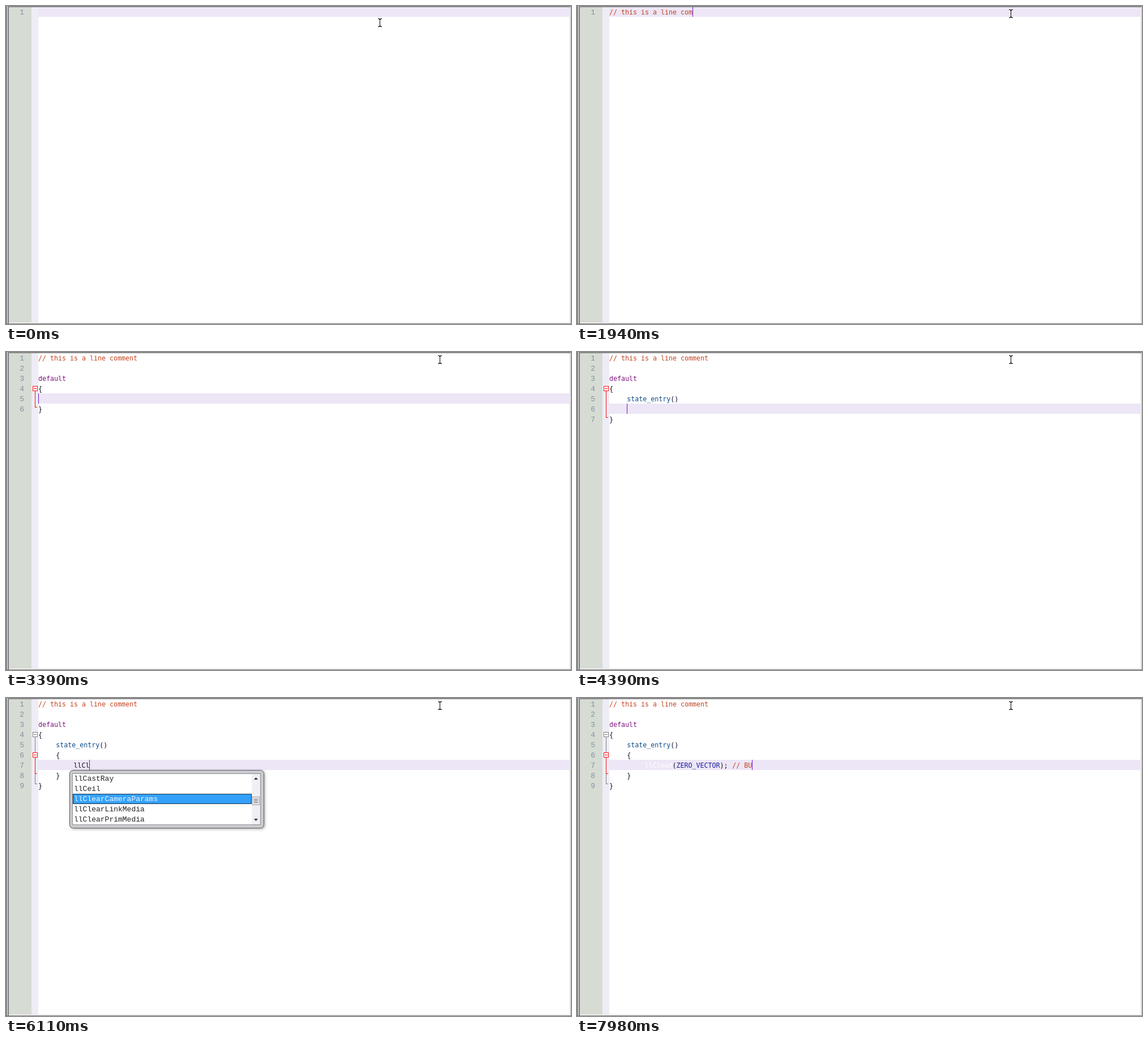
Animation, 998 px wide and 561 px high, one loop 8000 ms. Source, as an HTML page with a canvas:

```html
<!DOCTYPE html>
<html lang="en">
<head>
<meta charset="utf-8">
<title>Code editor with autocompletion</title>
<style>
  html, body { margin: 0; width: 100%; height: 100%; overflow: hidden; background: #fff; }
  canvas { display: block; }
</style>
</head>
<body>
<canvas id="stage" width="998" height="561"></canvas>
<script>
const ctx = document.getElementById('stage').getContext('2d');
const LOOP = 8000, LINE = 18, LEFT = 57, TAB = 31.2, BLINK = 530;
const CODE = '11.63px "DejaVu Sans Mono", monospace';
const COURIER = '13px "Liberation Mono", monospace';
const INK = '#101028', RED = '#ff1010', GRAY = '#808080';

// Sorted completion entries: constants, events and keywords, functions.
const WORDS = `VEHICLE_VERTICAL_ATTRACTION_TIMESCALE WANDER_PAUSE_AT_WAYPOINTS
  ZERO_ROTATION ZERO_VECTOR at_rot_target at_target attach changed collision
  collision_end collision_start control dataserver default do else float for
  http_request http_response if integer jump key land_collision land_collision_end
  land_collision_start link_message list listen llAbs llAcos llAddToLandBanList
  llBreakAllLinks llBreakLink llCSV2List llCastRay llCeil llClearCameraParams
  llClearLinkMedia llClearPrimMedia llCloseRemoteDataChannel llCloud
  llCollisionFilter llCollisionSound return rotation run_time_permissions sensor
  state state_entry state_exit string timer touch touch_end`.split(/\s+/);

const TOKEN_COLORS = {
  default: '#7d107d', state: '#7d107d', state_entry: '#0c4a88',
  llCloud: '#ffffff', ZERO_VECTOR: '#1c1c9c'
};

// Keystrokes: start time, interval, keys ("^" is cursor up).
const keystrokes = [
  [840, 60, '// this is a l'], [1700, 38, 'ine comment'], [2130, 60, '\n\n'],
  [2240, 50, 'defau'], [2510, 60, 'lt'], [2690, 130, '\n{\n}^'], [3360, 0, '\n'],
  [3460, 46, '\tstate_entry()'], [4200, 240, '\n{'], [5010, 120, '\n}^'],
  [5500, 120, '\n\t'], [5840, 80, 'llCloud('], [6480, 42, 'ZERO_VECT'],
  [6900, 70, 'OR'], [7100, 200, ');'], [7560, 82, ' // BU']
].flatMap(([start, step, chars]) => [...chars].map((key, i) => ({ time: start + i * step, key })));

function editorAt(t) {
  const ed = { lines: [''], row: 0, col: 0, last: { time: -760, key: '' } };
  for (const k of keystrokes) {
    if (k.time > t) break;
    const line = ed.lines[ed.row];
    if (k.key === '^') {
      ed.row--;
    } else if (k.key === '\n') {
      const indent = line.match(/^\t*/)[0];
      ed.lines.splice(ed.row, 1, line.slice(0, ed.col), indent + line.slice(ed.col));
      ed.row++;
      ed.col = indent.length;
    } else {
      ed.lines[ed.row] = line.slice(0, ed.col) + k.key + line.slice(ed.col);
      ed.col++;
    }
    ed.last = k;
  }
  return ed;
}

const lineTop = row => 1 + row * LINE;

function rect(x, y, w, h, color) {
  ctx.fillStyle = color;
  ctx.fillRect(x, y, w, h);
}

function drawText(str, x, y, color, font) {
  ctx.font = font;
  ctx.fillStyle = color;
  ctx.fillText(str, x, y);
}

function layoutLine(line) {
  let x = LEFT, col = 0;
  return (line.match(/\/\/.*|\s|\w+|./g) || []).map(str => {
    const token = { str, x, col };
    ctx.font = str === ' ' ? COURIER : CODE;
    token.width = str === '\t' ? TAB : ctx.measureText(str).width;
    token.color = str.startsWith('//') ? '#c4431f' : TOKEN_COLORS[str] || INK;
    x += token.width;
    col += str.length;
    return token;
  });
}

function columnX(line, col) {
  const tokens = layoutLine(line.slice(0, col)), end = tokens[tokens.length - 1];
  return end ? end.x + end.width : LEFT;
}

function findBrackets(lines) {
  return lines.flatMap((line, row) => [...line.replace(/\/\/.*/, '')]
    .map((ch, col) => ({ ch, row, col })).filter(b => '{}()'.includes(b.ch)));
}

function highlightedBraces(ed, all) {
  const at = all.find(b => b.row === ed.row && b.col === ed.col - 1) ||
             all.find(b => b.row === ed.row && b.col === ed.col);
  if (!at) return [];
  const kind = '{}'.includes(at.ch) ? '{}' : '()';
  const stack = [];
  for (const b of all.filter(b => kind.includes(b.ch))) {
    if (b.ch === kind[0]) { stack.push(b); continue; }
    const open = stack.pop();
    if (open === at || b === at) return [open, b];
  }
  return [at];
}

function foldsOf(lines, all) {
  const folds = [], stack = [];
  for (const b of all) {
    if ('{('.includes(b.ch)) {
      const fold = { start: b.row, end: lines.length - 1, closed: false };
      stack.push(fold);
      folds.push(fold);
    } else if (stack.length) {
      Object.assign(stack.pop(), { end: b.row, closed: true });
    }
  }
  return folds.filter(f => f.end > f.start || !f.closed);
}

function drawFolds(folds, row) {
  const active = folds.filter(f => f.start <= row && row <= f.end).pop();
  const color = f => f === active ? RED : GRAY;
  const ordered = folds.filter(f => f !== active).concat(active || []);
  for (const f of ordered) {
    if (f.end === f.start) continue;
    const y = lineTop(f.start) + 9, bottom = lineTop(f.end) + 6;
    rect(51, y, 1, bottom - y, color(f));
    rect(51, bottom, 4, 1, color(f));
  }
  for (const f of ordered) {
    const y = lineTop(f.start) + 5;
    rect(47, y, 9, 9, color(f));
    rect(48, y + 1, 7, 7, '#fff');
    rect(49, y + 4, 5, 1, color(f));
  }
}

function triangle(x, y, dir) {
  ctx.fillStyle = '#333';
  ctx.beginPath();
  ctx.moveTo(x - 3.5, y - 2 * dir);
  ctx.lineTo(x + 3.5, y - 2 * dir);
  ctx.lineTo(x, y + 2 * dir);
  ctx.fill();
}

function drawPopup(x, y, match) {
  ctx.save();
  ctx.shadowColor = 'rgba(60,65,60,.5)';
  ctx.shadowBlur = 5;
  ctx.shadowOffsetX = ctx.shadowOffsetY = 1.5;
  ctx.beginPath();
  ctx.roundRect(x + 0.5, y + 0.5, 343, 102, 6);
  ctx.fillStyle = '#cbcbcf';
  ctx.fill();
  ctx.restore();
  ctx.strokeStyle = '#5b5d62';
  ctx.stroke();
  rect(x + 5, y + 6, 333, 91, '#8e9094');
  rect(x + 6, y + 7, 331, 89, '#fff');

  const listX = x + 6, listY = y + 6;
  rect(listX, listY + 36, 316, 18, '#16324e');
  rect(listX + 1, listY + 37, 314, 16, '#33a1fb');
  WORDS.slice(match - 2, match + 3).forEach((word, i) =>
    drawText(word, listX + 2, listY + i * LINE + 13, i === 2 ? '#f0f8ff' : '#222', COURIER));

  rect(x + 322, y + 7, 15, 89, '#f0f0f4');
  rect(x + 323, y + 47, 13, 15, '#9a9ca0');
  rect(x + 324, y + 48, 11, 13, '#e9e9ec');
  for (let i = 0; i < 3; i++) rect(x + 326, y + 51 + i * 3, 7, 1, '#555');
  triangle(x + 329.5, y + 15, -1);
  triangle(x + 329.5, y + 88, 1);
}

function drawFrame(ed) {
  rect(0, 0, 998, 561, '#fff');
  rect(5, 2, 40, 557, '#d6dcd3');
  rect(45, 2, 12, 557, '#eeecf5');
  rect(LEFT, Math.max(2, lineTop(ed.row)), 938, ed.row ? LINE : LINE - 1, '#ede6f6');
  rect(0, 0, 2, 561, '#85888c');
  rect(2, 0, 1, 561, '#e0e0e0');
  rect(3, 0, 1, 561, '#a0a0a0');
  rect(4, 1, 1, 559, '#696969');
  rect(3, 0, 995, 1, '#a0a0a0');
  rect(4, 1, 993, 1, '#696969');
  rect(995, 2, 1, 557, '#e3e3e3');
  rect(997, 0, 1, 561, '#b0b0b0');
  rect(5, 558, 991, 1, '#e3e3e3');
  rect(0, 560, 998, 1, '#707070');
}

function drawPointer(t) {
  const p = Math.min(1, Math.max(0, (t - 30) / 690)), e = p * p * (3 - 2 * p);
  const x = Math.round(660 + 106 * e), y = Math.round(29 - 16 * e);
  rect(x, y - 6, 1, 13, '#000');
  for (const dy of [-7, 7]) {
    rect(x - 3, y + dy, 3, 1, '#000');
    rect(x + 1, y + dy, 3, 1, '#000');
  }
  rect(x - 1, y - 6, 3, 1, '#000');
  rect(x - 1, y + 6, 3, 1, '#000');
}

function draw(t) {
  const ed = editorAt(t), all = findBrackets(ed.lines);
  const lit = highlightedBraces(ed, all);
  drawFrame(ed);

  ed.lines.forEach((line, row) => {
    const baseline = lineTop(row) + 14;
    ctx.textAlign = 'right';
    drawText(row + 1, 32, baseline, '#8490a2', COURIER);
    ctx.textAlign = 'left';
    for (const { str, x, col, color } of layoutLine(line)) {
      if (!str.trim()) continue;
      const isLit = lit.some(b => b.row === row && b.col === col);
      drawText(str, x, baseline, isLit ? RED : color, isLit ? 'bold ' + CODE : CODE);
    }
  });
  drawFolds(foldsOf(ed.lines, all), ed.row);

  const line = ed.lines[ed.row];
  if ((t - ed.last.time) % (2 * BLINK) < BLINK) {
    const y = Math.max(2, lineTop(ed.row));
    rect(Math.round(columnX(line, ed.col) - 0.4), y, 1, lineTop(ed.row) + LINE - y, '#6a14c8');
  }

  const prefix = line.slice(0, ed.col).match(/\w*$/)[0];
  const match = prefix ? WORDS.findIndex(w => w.startsWith(prefix)) : -1;
  if (match >= 0 && /\w/.test(ed.last.key)) {
    const wordX = columnX(line, ed.col - prefix.length);
    drawPopup(Math.round(wordX) - 7, lineTop(ed.row) + LINE, match);
  }
  drawPointer(t);
}

const began = performance.now();
function tick() {
  draw((performance.now() - began) % LOOP);
  requestAnimationFrame(tick);
}
tick();
</script>
</body>
</html>
```
